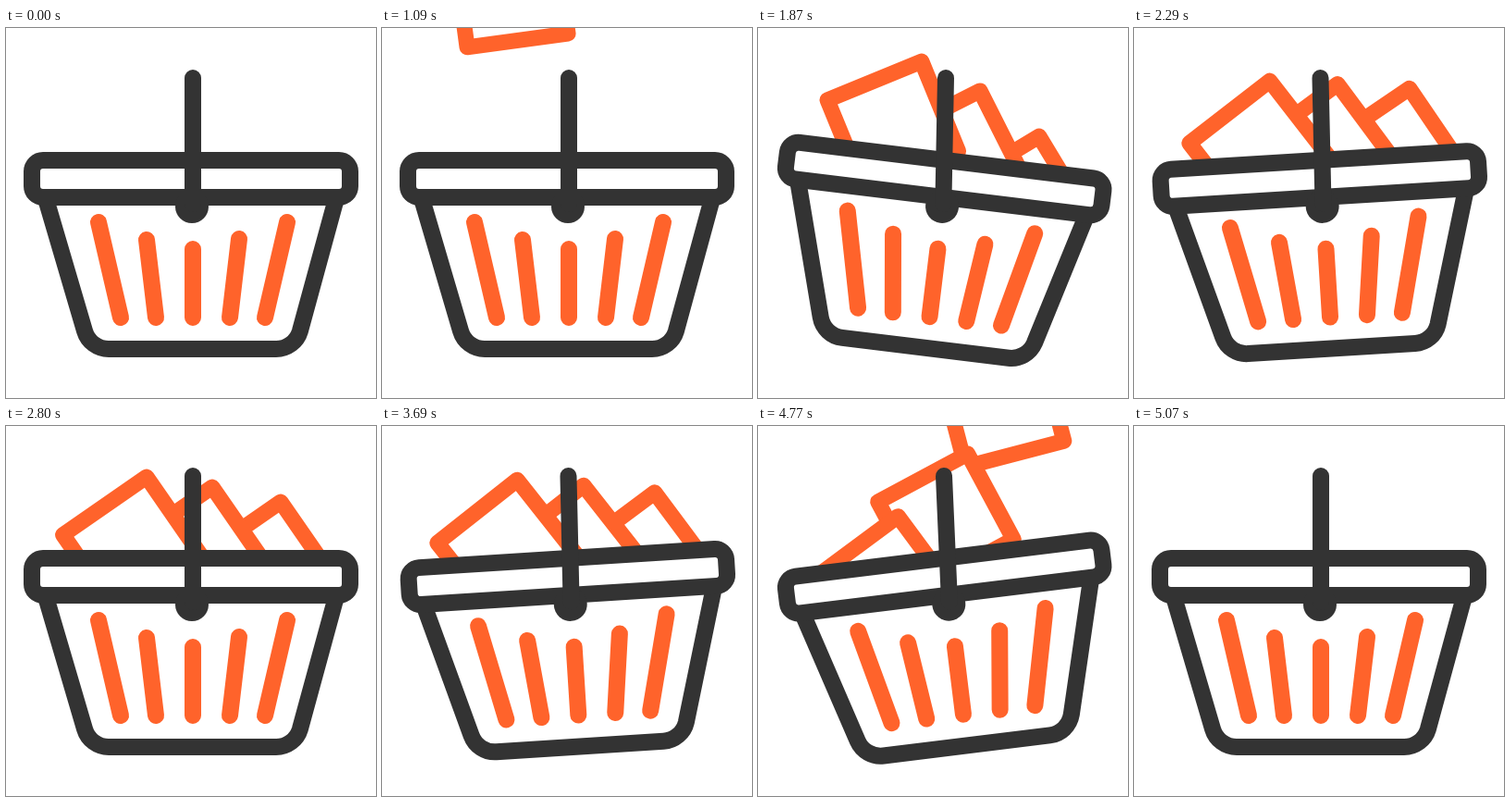
Animation of 400x400 px, one loop 5160 ms. Source, as an HTML page:

```html
<!DOCTYPE html>
<html lang="en">
<head>
<meta charset="utf-8">
<title>Shopping basket</title>
<style>
  html, body { margin: 0; width: 100%; height: 100%; overflow: hidden; background: #fff; }
  svg { display: block; width: 100%; height: 100%; }
  g { stroke-width: 18; stroke-linecap: round; stroke-linejoin: round; }
  .dark { stroke: #333; fill: #fff; }
  .bright { stroke: #ff632b; fill: #fff; }
  .item { stroke-width: 17; }
</style>
</head>
<body>
<svg viewBox="0 0 400 400">
  <defs>
    <clipPath id="aboveRim"><rect x="-300" y="-500" width="1000" height="663"/></clipPath>
  </defs>
  <g id="basket">
    <g id="items" class="bright" clip-path="url(#aboveRim)">
      <rect class="item" x="-110" width="110" height="105"/>
      <rect class="item" x="-110" width="110" height="105"/>
      <rect class="item" x="-110" width="110" height="105"/>
    </g>
    <g class="dark">
      <path d="M44 188L85.1 327.7A27 27 0 0 0 111 347H292A27 27 0 0 0 317.9 327.7L356 188"/>
      <rect x="28" y="143" width="344" height="40" rx="12"/>
    </g>
    <path class="bright" d="M100 210L124 313M152 229L162 313M202 239V313M252 228L242 313M304 210L280 313"/>
    <circle cx="201" cy="193" r="18" fill="#333"/>
  </g>
  <g class="dark"><line id="handle"/></g>
</svg>
<script>
const LOOP = 5160, STEP = 30, FILL = 1090, FULL = 2800, EMPTY = 3360, LAST = 57;
const CENTER = { x: 200, y: 163 };

// [step, basket angle]
const SWING = [[3, 0], [15, -14], [27, 7.3], [42, -4], [57, 0]];

// [step, dx, dy, turn] away from the resting pose
const DROP = [
  [-1, 38.5, -184, 30], [0, 35, -153, 27], [3, 24, -74, 18], [5, 18, -32, 13.5],
  [9, 6, 37, 5.2], [12.5, 1, 50, 0], [17, -1, 23, -3.3], [22, 3.6, -2, 1],
  [26, 8, -15, 5.5], [35, 3, -5, 2], [40, .5, -1, .4], [44, 0, 0, 0]
];

// Resting top right corners, front to back
const ITEMS = [
  { x: 152, y: 55, delay: 0 },
  { x: 223, y: 66, delay: 4 },
  { x: 297, y: 82, delay: 9 }
];
const TILT = -34.7;

const basket = document.getElementById('basket');
const handle = document.getElementById('handle');
const boxes = [...document.querySelectorAll('.item')].reverse();

function swing(k) {
  if (k <= SWING[0][0] || k >= LAST) return 0;
  const i = SWING.findIndex(key => key[0] > k);
  const [k0, a] = SWING[i - 1], [k1, b] = SWING[i];
  return a + (b - a) * (1 - Math.cos(Math.PI * (k - k0) / (k1 - k0))) / 2;
}

function slope(i, c) {
  const a = DROP[Math.max(i - 1, 0)], b = DROP[Math.min(i + 1, DROP.length - 1)];
  return i === DROP.length - 1 ? 0 : (b[c] - a[c]) / (b[0] - a[0]);
}

// Smooth curve through the drop keys
function drop(k) {
  const i = DROP.findIndex(key => key[0] > k);
  if (i < 0) return [0, 0, 0];
  const p = DROP[i - 1], q = DROP[i], span = q[0] - p[0], u = (k - p[0]) / span;
  const u2 = u * u, u3 = u2 * u;
  return [1, 2, 3].map(c =>
    (2 * u3 - 3 * u2 + 1) * p[c] + (3 * u2 - 2 * u3) * q[c] +
    span * ((u3 - 2 * u2 + u) * slope(i - 1, c) + (u3 - u2) * slope(i, c)));
}

function stepAt(t) {
  if (t < FILL) return -1;
  if (t < FULL) return Math.floor((t - FILL) / STEP);
  if (t < EMPTY) return LAST;
  return Math.max(-1, LAST - 1 - Math.floor((t - EMPTY) / STEP));
}

function draw(k) {
  const angle = swing(k), shift = Math.abs(angle) * .24;
  basket.setAttribute('transform',
    `translate(${shift} 0) rotate(${angle} ${CENTER.x} ${CENTER.y})`);

  const r = angle * Math.PI / 180, s = Math.sin(r), c = Math.cos(r);
  const line = {
    x1: 202 + angle / 7, y1: 54,
    x2: CENTER.x + shift + 2 * c - 27 * s, y2: CENTER.y + 2 * s + 27 * c
  };
  for (const name in line) handle.setAttribute(name, line[name]);

  ITEMS.forEach((item, i) => {
    const age = k - item.delay, shown = k >= 0 && age >= -1;
    boxes[i].style.display = shown ? '' : 'none';
    if (!shown) return;
    const [dx, dy, turn] = drop(age);
    boxes[i].setAttribute('transform',
      `translate(${item.x + dx} ${item.y + dy}) rotate(${TILT + turn})`);
  });
}

const start = performance.now();
function tick() {
  draw(stepAt((performance.now() - start) % LOOP));
  requestAnimationFrame(tick);
}
tick();
</script>
</body>
</html>
```
